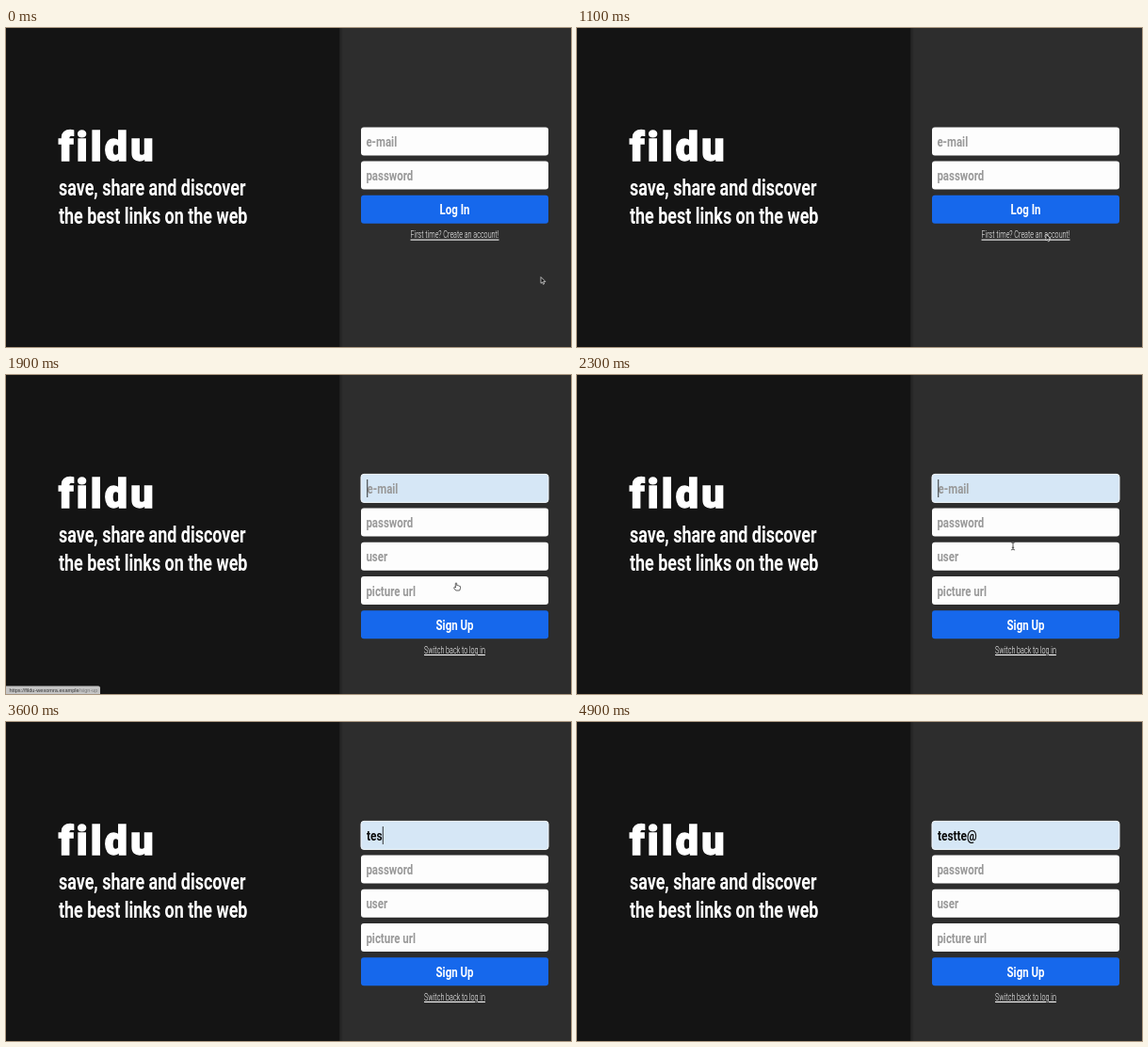
An HTML page for the animation above (5 s loop, 600 px wide and 339 px high).

```html
<!DOCTYPE html>
<html lang="en">
<head>
<meta charset="utf-8">
<title>Sign up demo</title>
<style>
  html, body { margin: 0; width: 100%; height: 100%; overflow: hidden; background: #141414; }
  svg { display: block; width: 100vw; height: 100vh; }
  text { font-family: Roboto, "Liberation Sans", sans-serif; font-weight: 700; fill: #fff; }
  .brand { font-size: 43px; font-weight: 900; letter-spacing: 3.2px; stroke: #fff; stroke-width: 1.5px; }
  .tagline { font-size: 23px; }
  .label { font-size: 14.7px; }
  .hint { fill: #999; }
  .typed { font-size: 15.2px; fill: #0b0b0b; }
  .link { font-size: 10.6px; font-weight: 300; text-decoration: underline; }
  .status { font: 5.58px "Liberation Sans", Arial, sans-serif; fill: #333; }
  .status tspan { fill: #777; }
  .middle { text-anchor: middle; }
</style>
</head>
<body>
<svg id="stage" viewBox="0 0 600 339" preserveAspectRatio="none">
  <defs>
    <linearGradient id="edge">
      <stop offset="0" stop-color="#000" stop-opacity=".3"/>
      <stop offset="1" stop-color="#000" stop-opacity="0"/>
    </linearGradient>
  </defs>
  <rect width="354" height="339" fill="#141414"/>
  <rect x="354" width="246" height="339" fill="#2d2d2d"/>
  <rect x="354" width="4" height="339" fill="url(#edge)"/>
</svg>
<script>
const LOOP = 5000, STEP = 100;
const BOLD = 0.78, LIGHT = 0.68;   // condensed proportions of the two weights
const LEFT = 377, WIDTH = 199, CENTER = 476.5, TEXT_X = 383;
const stage = document.getElementById('stage');

function add(parent, tag, attrs = {}, content = '') {
  const node = document.createElementNS('http://www.w3.org/2000/svg', tag);
  for (const key in attrs) node.setAttribute(key, attrs[key]);
  node.textContent = content;
  return parent.appendChild(node);
}

const write = (parent, content, cls, x, y, condense = BOLD) =>
  add(parent, 'text', { class: cls, transform: `translate(${x} ${y}) scale(${condense} 1)` }, content);

const show = (node, visible) => node.setAttribute('visibility', visible ? 'visible' : 'hidden');

const rowY = row => 105.4 + row * 36.2;

function box(parent, row, fill) {
  return add(parent, 'rect', { x: LEFT, y: rowY(row), width: WIDTH, height: 30, rx: 3, fill });
}

function field(parent, row, hint) {
  return {
    frame: box(parent, row, '#fdfdfd'),
    hint: write(parent, hint, 'label hint', TEXT_X - 0.6, rowY(row) + 20.6)
  };
}

function submitRow(parent, row, label, link) {
  box(parent, row, '#1668ec');
  write(parent, label, 'label middle', CENTER, rowY(row) + 20.4);
  write(parent, link, 'link middle', CENTER, rowY(row) + 45.6, LIGHT);
}

write(stage, 'fildu', 'brand', 56, 141, 1);
write(stage, 'save, share and discover', 'tagline', 56, 178);
write(stage, 'the best links on the web', 'tagline', 56, 207.5);

const email = field(stage, 0, 'e-mail');
field(stage, 1, 'password');

const login = add(stage, 'g');
submitRow(login, 2, 'Log In', 'First time? Create an account!');

const signup = add(stage, 'g');
field(signup, 2, 'user');
field(signup, 3, 'picture url');
submitRow(signup, 4, 'Sign Up', 'Switch back to log in');

const typed = write(stage, '', 'typed', TEXT_X, 126);
const caret = add(stage, 'rect', { y: 111, width: 0.9, height: 19, fill: '#222' });

const status = add(stage, 'g');
add(status, 'path', { d: 'M0 330.5H98Q100 330.5 100 332.5V339H0Z', fill: '#c4c4c4' });
const address = add(status, 'text', { class: 'status', x: 3.5, y: 337 }, 'https://fildu-wexomra.example');
add(address, 'tspan', {}, '/sign-up');

const pointer = (d, attrs) =>
  add(stage, 'path', { d, 'stroke-linejoin': 'round', 'stroke-linecap': 'round', ...attrs });
const pointers = {
  arrow: pointer('M0 0V6.3L1.5 5L2.5 7.4L3.6 6.9L2.6 4.6H4.5Z',
    { fill: '#111', stroke: '#eee', 'stroke-width': 0.7 }),
  hand: pointer('M-1.2 5V.8Q-.5 -.2 .2 .8V3.2Q1 2.6 1.6 3.4Q2.4 2.9 2.9 3.8Q3.9 3.4 4 4.6V6.2L3.2 8.5H-.8L-3 5.6Q-2.6 4.2 -1.2 5Z',
    { fill: '#fff', stroke: '#222', 'stroke-width': 0.7 }),
  beam: pointer('M-1.7 -4Q0 -4 0 -3Q0 -4 1.7 -4M0 -3V3M-1.7 4Q0 4 0 3Q0 4 1.7 4M-.8 1.4H.8',
    { fill: 'none', stroke: '#333', 'stroke-width': 0.8 })
};

// [time, x, y]
const route = [
  [0, 568, 265], [600, 508.5, 228], [1100, 498, 219.5], [1500, 498, 219.5],
  [1800, 478.5, 220.5], [1900, 478.5, 220.5], [2100, 471, 210], [2700, 447, 125.6]
];

// [time, text]
const typing = [
  [0, ''], [3300, 't'], [3400, 'te'], [3500, 'tes'], [3700, 'test'],
  [3900, 'testt'], [4000, 'testte'], [4400, 'testte@']
];

function positionAt(t) {
  const next = route.findIndex(point => point[0] > t);
  if (next < 0) return route[route.length - 1].slice(1);
  const [t0, x0, y0] = route[next - 1], [t1, x1, y1] = route[next];
  const k = (t - t0) / (t1 - t0);
  return [x0 + (x1 - x0) * k, y0 + (y1 - y0) * k];
}

function pointerAt(t) {
  if (t >= 3300) return 'none';
  if (t >= 2000) return 'beam';
  return t >= 1600 ? 'hand' : 'arrow';
}

function render(t) {
  const joining = t >= 1900;
  show(login, !joining);
  show(signup, joining);

  const text = typing.filter(entry => entry[0] <= t).pop()[1];
  typed.textContent = text;
  show(email.hint, !text);
  email.hint.setAttribute('transform', `translate(${joining ? TEXT_X + 0.6 : TEXT_X - 0.6} 126) scale(${BOLD} 1)`);
  email.frame.setAttribute('fill', joining ? '#d6e7f6' : '#fdfdfd');
  email.frame.setAttribute('stroke', joining ? '#f4f9fd' : 'none');

  const end = text ? typed.getComputedTextLength() * BOLD : 0;
  caret.setAttribute('x', TEXT_X + 0.3 + end);
  show(caret, joining && !(t >= 2500 && t < 3000) && t < 4900);

  show(status, t >= 1700 && t < 2300);

  const [x, y] = positionAt(t), active = pointerAt(t);
  for (const name in pointers) {
    show(pointers[name], name === active);
    pointers[name].setAttribute('transform', `translate(${x} ${y})`);
  }
}

const start = performance.now();
function tick() {
  const t = (performance.now() - start) % LOOP;
  render(Math.floor(t / STEP) * STEP);
  requestAnimationFrame(tick);
}
tick();
</script>
</body>
</html>
```
